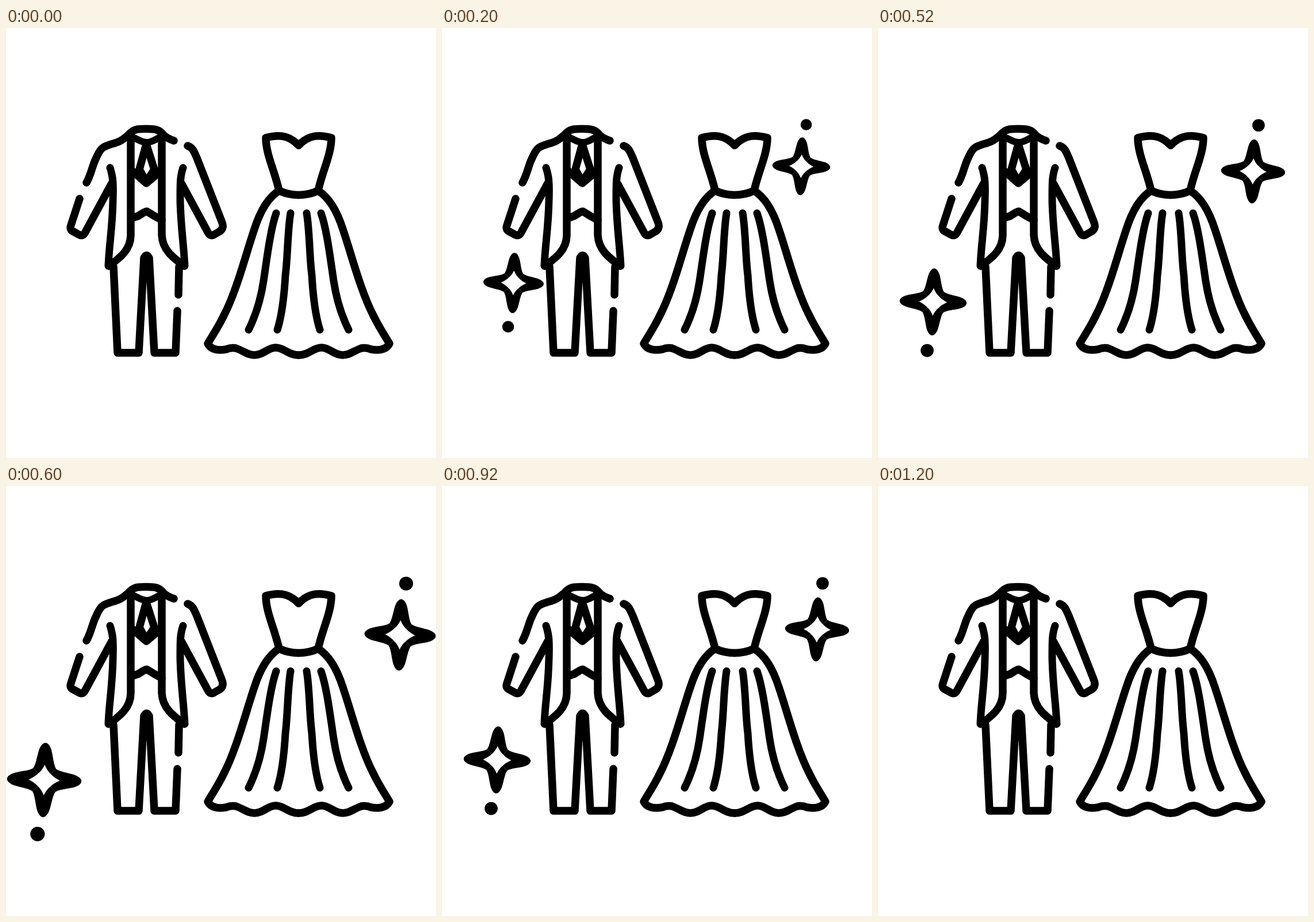
Write an HTML page that moves like this. It is 748 px wide and 748 px high and loops after 1400 ms.

```html
<!DOCTYPE html>
<html lang="en">
<head>
<meta charset="utf-8">
<title>Suit and dress</title>
<style>
  html, body { margin: 0; width: 100%; height: 100%; overflow: hidden; background: #fff; }
  svg { display: block; width: 100vw; height: 100vh; }
  .line { fill: none; stroke: #000; stroke-width: 13.5; stroke-linecap: round; stroke-linejoin: round; }
</style>
</head>
<body>
<svg viewBox="0 0 748 748">
  <defs>
    <!-- Four-pointed star, 100 units from centre to tip -->
    <g id="star">
      <path id="arm" d="M-31 -31C-24 -41 -22 -62 -17 -80C-13 -92 -7 -100 0 -100S13 -92 17 -80C22 -62 24 -41 31 -31L0 0Z"/>
      <use href="#arm" transform="rotate(90)"/>
      <use href="#arm" transform="rotate(180)"/>
      <use href="#arm" transform="rotate(270)"/>
      <path fill="#fff" d="M0 -41Q7 -25 17 -17Q25 -8 42 0Q25 8 17 17Q7 25 0 41Q-7 25 -17 17Q-25 8 -42 0Q-25 -8 -17 -17Q-7 -25 0 -41Z"/>
    </g>
    <g id="half" class="line">
      <path d="M509 204C490 184 470 186 452 191C452 220 468 250 475 283C488 289 498 290.5 509 290.5"/>
      <path d="M475 283C454 296 441 322 432 350C417 394 401 458 379 500C369 521 359 535 351 549C357 561 371 561 383 559C390 556 394 556 400 557C414 562 420 569 432 569C448 569 455 556 469 556C484 556 491 569 509 569"/>
      <path stroke-width="13" d="M470 322C460 350 454 400 448 440C442 480 432 505 422 525"/>
      <path stroke-width="13" d="M495 322C490 350 490 400 486 430C484 465 480 500 472 525"/>
    </g>
  </defs>

  <g class="line">
    <!-- Collar and shoulders -->
    <path d="M140 269C148 255 150 240 156 228C165 207 167 207 190 200C204 196 208 189 213 186C222 175 231 175.5 243 175.5C262 175 268 178 274 186C280 192 286 194 292 196"/>
    <path stroke-width="12" d="M214 188C227 191 234 199 245 199S262 191 273 188"/>
    <!-- Sleeves -->
    <path d="M128 297L113 343Q110 351 117 354L128 360Q134 363 138 355L184 270"/>
    <path d="M316 205C325 208 327 215 332 226L375 336Q380 347 373 353L361 360Q355 363 351 355L305 270"/>
    <!-- Jacket -->
    <path stroke-width="13" d="M181 243C186 258 187 270 186 300C185 350 179 380 178 414"/>
    <path stroke-width="13" d="M308 243C303 257 303 268 303 300C304 345 309 375 311 414"/>
    <path d="M217 194V360C217 386 198 400 179 414M271 192V360C272 386 291 400 310 414"/>
    <!-- Tie and vest -->
    <path d="M244 202L232 246L244 268L258 246Z"/>
    <path d="M220 249L244 270L269 249M218 331L230 327Q244 318 245 319L258 327L271 334"/>
    <!-- Trousers -->
    <path d="M187 415L194 565H231L240 400Q244.5 391 249 400L258 565H295L298 492M301 415L300 464"/>
  </g>

  <use href="#half"/>
  <use href="#half" transform="matrix(-1 0 0 1 1018 0)"/>

  <g id="left">
    <use href="#star" transform="rotate(2)"/>
    <circle cx="-18" cy="145" r="19.5"/>
  </g>
  <g id="right">
    <use href="#star" transform="rotate(2)"/>
    <circle cx="17" cy="-144" r="19.5"/>
  </g>
</svg>
<script>
  const STEP = 200, STEPS = 7;
  // Centre x, centre y and radius at each sparkle level
  const sparkles = {
    left: [[124.5, 443.5, 52.5], [96, 476.5, 58.3], [66.5, 511.5, 64.7]],
    right: [[625, 240.5, 50.3], [652.5, 249.5, 55.7], [685.5, 259, 62]]
  };

  function draw(now) {
    const step = Math.floor(now / STEP) % STEPS;
    const level = 3 - Math.abs(3 - step);
    for (const id in sparkles) {
      const group = document.getElementById(id);
      group.setAttribute("visibility", level ? "visible" : "hidden");
      if (!level) continue;
      const [x, y, r] = sparkles[id][level - 1];
      group.setAttribute("transform", `translate(${x} ${y}) scale(${r / 100})`);
    }
  }

  const start = performance.now();
  function tick() {
    draw(performance.now() - start);
    requestAnimationFrame(tick);
  }
  tick();
</script>
</body>
</html>
```
